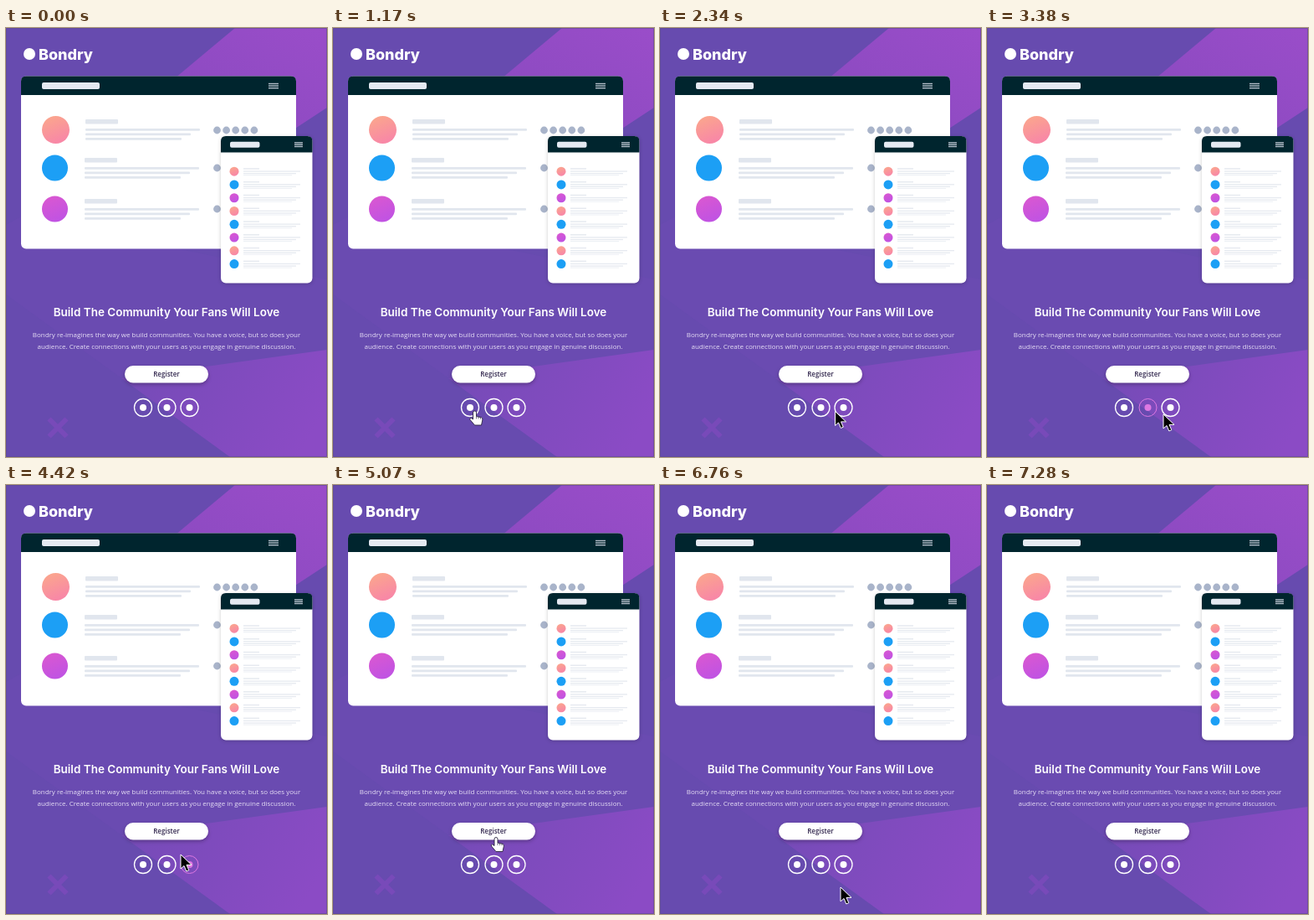
An HTML page that plays this animation: 384x512 px, repeating every 7.54 s.

```html
<!DOCTYPE html>
<html lang="en">
<head>
<meta charset="utf-8">
<title>Landing page</title>
<style>
  html, body { margin: 0; height: 100%; overflow: hidden; background: #674baf; }
  svg { display: block; width: 100vw; height: 100vh; }
  text { font-family: "Open Sans", sans-serif; font-size: 8px; text-anchor: middle; }
  .soft { filter: blur(.4px); }
  .heading { font-family: Inter, sans-serif; font-weight: 600; font-size: 13.5px; fill: #fff; }
  .brand { font-family: Inter, sans-serif; font-weight: 800; font-size: 18px; fill: #fff; text-anchor: start; }
  .body { fill: #e6def5; }
  .social { --c: #fff; }
  .social.on { --c: #de78e2; }
  .social .ring { fill: none; stroke: var(--c); stroke-width: 1.3; }
  .social.on .ring { stroke-width: 1; }
  .social .mark { fill: var(--c); }
  #register rect { fill: #fff; filter: drop-shadow(0 2px 2px #0004); }
  #register text { fill: #33284f; font-weight: 600; }
  #register.on rect { fill: #e882e8; }
  #register.on text { fill: #f6b6f4; }
</style>
</head>
<body>
<svg viewBox="0 0 384 512" preserveAspectRatio="none">
  <defs>
    <linearGradient id="coral" x2=".4" y2="1"><stop stop-color="#fba98a"/><stop offset="1" stop-color="#f888a6"/></linearGradient>
    <linearGradient id="purple" x2=".4" y2="1"><stop stop-color="#dc58cf"/><stop offset="1" stop-color="#c153e2"/></linearGradient>
    <linearGradient id="top" x1="1" x2="0" y2="1"><stop stop-color="#9a4dc9"/><stop offset="1" stop-color="#8549bd"/></linearGradient>
    <linearGradient id="low" gradientUnits="userSpaceOnUse" x1="150" y1="400" x2="350" y2="512"><stop stop-color="#754bb7"/><stop offset="1" stop-color="#8b4bc5"/></linearGradient>
  </defs>

  <rect width="384" height="512" fill="#674baf"/>
  <g class="soft">
    <path d="M274 0H384V95L300 150 160 95Z" fill="url(#top)"/>
    <path d="M0 235L18 225 384 300V512H268L0 318Z" fill="#6a4bb1"/>
    <path d="M384 384V512H268L138 418Z" fill="url(#low)"/>
    <path d="M51.5 466.500l21 21m0-21l-21 21" stroke="#784ab9" stroke-width="6"/>

    <circle cx="28" cy="31" r="7" fill="#fff"/>
    <text class="brand" x="39" y="37.5">Bondry</text>

    <g id="mockups"></g>

    <text class="heading" x="192" y="344">Build The Community Your Fans Will Love</text>
    <text class="body" x="192" y="369">Bondry re-imagines the way we build communities. You have a voice, but so does your</text>
    <text class="body" x="192" y="383">audience. Create connections with your users as you engage in genuine discussion.</text>

    <g id="register">
      <rect x="142" y="403" width="100" height="20.5" rx="10"/>
      <text x="192" y="416">Register</text>
    </g>
    <g id="socials"></g>
  </g>
  <rect x=".5" y=".5" width="383" height="511" fill="none" stroke="#5b4a90" opacity=".6"/>

  <g id="cursor">
    <path id="arrow" d="M0 0V17l4-3.5 2.8 6.5 3-1.3-2.8-6.3H13Z" stroke="#fff"/>
    <g id="hand">
      <path d="M-2 1.5a2 2 0 0 1 4 0V6l6 1.3q1.8.8 1.3 3L8 16.5H0L-5.5 10q-.8-2 1-2.2L-2 9.5Z" fill="#fff" stroke="#2b2440" stroke-width=".9"/>
      <path d="M2 6v3m2.5-2.5v2.6M7 7v2.4" stroke="#2b2440" stroke-width=".6"/>
    </g>
  </g>
</svg>

<script>
const $ = id => document.getElementById(id);
const STEP = 130, LOOP = 7540;
const avatars = ['url(#coral)', '#1c9ff5', 'url(#purple)'];

const box = (x, y, w, h, fill, r = 0) =>
  `<rect x="${x}" y="${y}" width="${w}" height="${h}" rx="${r}" fill="${fill}"/>`;
const dot = (x, y, r, fill) => `<circle cx="${x}" cy="${y}" r="${r}" fill="${fill}"/>`;
const menu = (x, y, w, gap) =>
  [0, 1, 2].map(i => box(x, y + i * gap, w, 1.4, '#b4bdc9')).join('');

function panel(x, y, w, h, bar) {
  return box(x, y, w, h, '#fff', 6) +
    `<path d="M${x} ${y + bar}V${y + 6}q0-6 6-6H${x + w - 6}q6 0 6 6V${y + bar}Z" fill="#00252e"/>`;
}

function desktop() {
  let out = panel(18, 57.5, 329, 206, 22.5) + box(43, 65, 69, 8, '#e4e9f1', 2) + menu(314, 65.8, 12, 2.6);
  [121.5, 167, 216].forEach((y, i) => {
    const x = i ? 94 : 95, top = y - (i ? 12 : 12.5);
    out += dot(i ? 58.5 : 59.5, y, i ? 15.5 : 16.5, avatars[i]) + box(x, top, 39, 5.5, '#e1e6ee', 1);
    [137, 126, 115].forEach((w, j) => out += box(x, top + 11 + j * 5.5, w, 2.8, '#e1e6ee', 1));
    for (let k = 0; k < (i ? 1 : 5); k++) out += dot(252.5 + k * 11.1, i ? y : 122, 4.4, '#a9b4ca');
  });
  return out;
}

function mobile() {
  let out = `<g style="filter:drop-shadow(0 1px 2px #0003)">${panel(257, 129, 109.5, 175.5, 19.5)}</g>` +
    box(268, 135.7, 35.5, 7, '#e4e9f1', 2) + menu(345, 136.2, 10, 2.3);
  for (let i = 0; i < 8; i++) {
    const y = 171.2 + i * 15.77;
    out += dot(273, y, 5.5, avatars[i % 3]) + box(284, y - 4, 19, 1.5, '#e6eaf0') +
      box(284, y - .8, 68, 1.3, '#e6eaf0') + box(284, y + 1.8, 63, 1.3, '#e6eaf0') +
      box(284, y + 4, 58, 1, '#eceff4');
  }
  return out;
}

$('mockups').innerHTML = desktop() + mobile();

const socialX = [164, 192.5, 219.5], socialY = 453;
$('socials').innerHTML = socialX.map(x =>
  `<g class="social"><circle class="ring" cx="${x}" cy="${socialY}" r="10.5"/>
   <circle class="mark" cx="${x}" cy="${socialY}" r="4"/></g>`).join('');
const targets = [...document.querySelectorAll('.social'), $('register')];

// Pointer route: time, x, y
const route = [
  [520, 152, 500], [910, 165, 472], [1170, 169.5, 457.5], [1560, 167, 456], [2080, 169, 458],
  [2210, 178, 464], [2340, 209.5, 457.5], [2470, 199, 457], [2860, 195, 455], [3250, 199, 457],
  [3380, 211, 461], [3510, 215, 458], [3900, 218, 455], [4160, 218, 455], [4290, 214, 449],
  [4420, 209, 441], [4810, 202, 429], [5070, 195, 421], [6110, 195, 421], [6240, 194, 420],
  [6500, 204, 448], [6760, 216, 480], [7020, 225, 512]
];

function pointer(t) {
  const i = route.findIndex(p => p[0] >= t);
  if (t < route[0][0] || i < 0) return null;
  const [t1, x1, y1] = route[i], [t0, x0, y0] = route[Math.max(i - 1, 0)];
  const k = t1 > t0 ? (t - t0) / (t1 - t0) : 1;
  return [x0 + (x1 - x0) * k, y0 + (y1 - y0) * k];
}

function hit(p) {
  if (!p) return -1;
  const [x, y] = p;
  if (x > 142 && x < 242 && y > 403 && y < 423.5) return 3;
  return socialX.findIndex(cx => Math.hypot(x - cx, y - socialY) < 10.5);
}

function draw(now) {
  const t = Math.min(Math.floor(now % LOOP / STEP) * STEP, LOOP - 2 * STEP);
  const pos = pointer(t);
  // Hover colours follow the pointer one step late.
  const hovered = hit(pointer(t - STEP));
  targets.forEach((el, i) => el.classList.toggle('on', i === hovered));
  $('cursor').style.display = pos ? '' : 'none';
  if (pos) {
    const over = hit(pos) >= 0;
    $('cursor').setAttribute('transform', `translate(${pos})`);
    $('hand').style.display = over ? '' : 'none';
    $('arrow').style.display = over ? 'none' : '';
  }
}

const start = performance.now();
(function tick() {
  draw(performance.now() - start);
  requestAnimationFrame(tick);
})();
</script>
</body>
</html>
```
